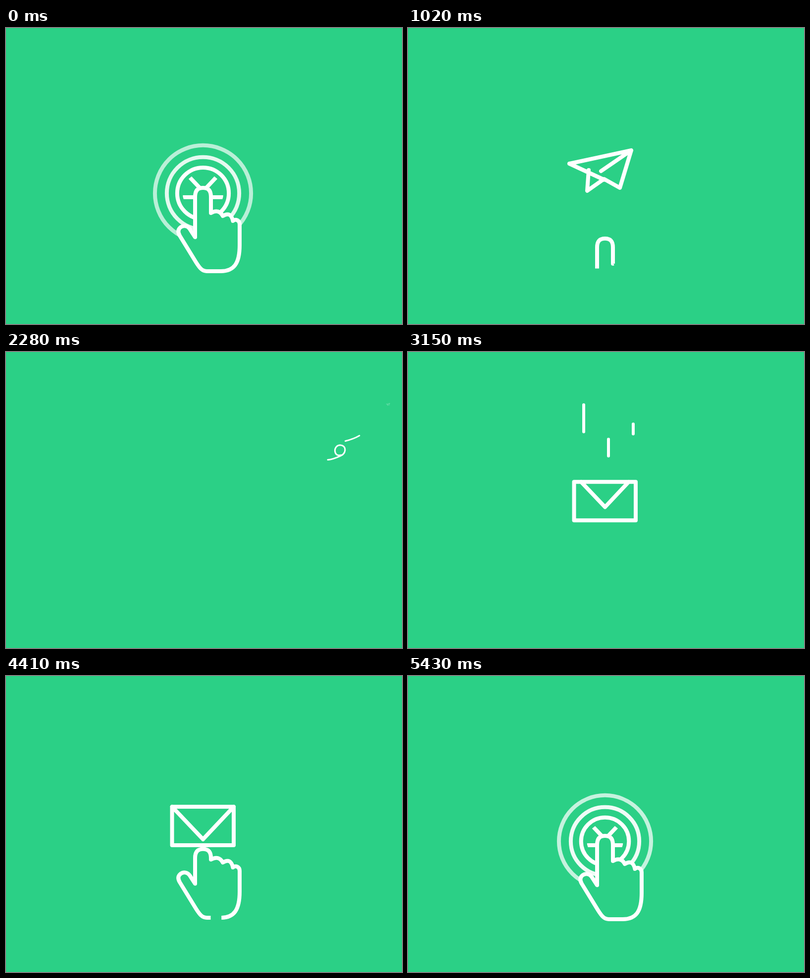
Write an HTML page that moves like this. It is 800 by 600 pixels and loops after 5460 ms.

```html
<!DOCTYPE html>
<html lang="en">
<head>
<meta charset="utf-8">
<title>Send mail</title>
<style>
  html, body { margin: 0; width: 100%; height: 100%; overflow: hidden; background: #2bd086; }
  svg { display: block; width: 100%; height: 100%; }
</style>
</head>
<body>
<svg viewBox="0 0 800 600" fill="none" stroke="#fff" stroke-width="8" stroke-linejoin="round">
  <clipPath id="reveal"><circle id="hole" cx="398" cy="335"/></clipPath>
  <g id="rings"></g>
  <g id="speed" stroke-width="6" stroke-linecap="round"></g>
  <g id="trail" stroke-width="3" stroke-linecap="round">
    <path id="loop" pathLength="1" d="M650 218.500C660 218 670 213 677 210C684 206.500 686 200 684.500 195C682 188 672 187 667.500 192C663 197 664 205 668 208C671 210 675 209.500 677 209"/>
    <path id="dash" pathLength="1" d="M685.500 180.500Q702 176.500 714 169.500"/>
  </g>
  <g id="mailClip"><path id="mail" stroke-linecap="round"/></g>
  <g id="hand">
    <path id="palm" fill="#2bd086" stroke="none"/>
    <path id="left" pathLength="1"/>
    <path id="right" pathLength="1"/>
  </g>
</svg>
<script>
const LOOP = 5460, STEP = 30;
const $ = id => document.getElementById(id);
const set = (el, attrs) => { for (const k in attrs) el.setAttribute(k, attrs[k]); };
const show = (el, on) => { el.style.display = on ? '' : 'none'; };
const clamp = x => Math.min(1, Math.max(0, x));
const span = (t, a, b) => clamp((t - a) / (b - a));
const mix = (a, b, u) => a + (b - a) * u;
const easeIO = u => u < .5 ? 2 * u * u : 1 - 2 * (1 - u) ** 2;
const easeOut = u => 1 - (1 - u) ** 2;

function add(parent, tag) {
  return parent.appendChild(document.createElementNS('http://www.w3.org/2000/svg', tag));
}

// radius at the loop point, speed, deceleration, step at which the ring has faded
const rings = [[97, 3.945, .055, 12.8], [73, 3.94, .061, 16.6], [52, 3.75, .07, 20.4]]
  .map(spec => ({ spec, el: add($('rings'), 'circle') }));
// x, top, length
const lines = [[355, 38, 176], [405, 134, 109], [455, 121, 64]]
  .map(spec => ({ spec, el: add($('speed'), 'path') }));

const plane = [[326, 275], [451, 248], [428, 324], [396, 306], [362, 330], [365, 288], [396, 307.5], [390, 290]];

function envelope(flap) {
  const inset = flap * .95, tip = [398, 331 - flap];
  return {
    corners: [[335.5, 265], [460, 265], [460, 343], [398, 343], [335.5, 343], [335.5, 265], tip, tip],
    hinge: [[335.5 + inset, 265], [460 - inset, 265]]
  };
}

function drawMail(t) {
  const visible = t < 2420 || t >= 2910;
  show($('mail'), visible);
  if (!visible) return;
  const u = t < 2500 ? easeIO(span(t, 600, 900)) : 0;
  const flap = t > 2500 ? 15 * (1 - easeIO(span(t, 3130, 3480))) : 0;
  const env = envelope(flap);
  const blend = (p, q) => [mix(p[0], q[0], u), mix(p[1], q[1], u)];
  const p = env.corners.map((c, i) => blend(c, plane[i]));
  const [a, b] = env.hinge.map((c, i) => blend(c, plane[i]));
  let place = '', opacity = 1;
  if (t > 2500) {
    place = `translate(0 ${dropY(t)})`;
    opacity = span(t, 2880, 2970);
  } else if (t >= 1110) {
    const back = easeIO(span(t, 1110, 1680));
    const fly = easeIO(span(t, 1680, 2400)), rest = 1 - fly;
    const curve = (from, bend, to) => rest * rest * from + 2 * rest * fly * bend + fly * fly * to;
    const x = t < 1680 ? 388 - 48 * back : curve(340, 705, 781);
    const y = t < 1680 ? 290 + 24 * back : curve(314, 215, 93);
    place = `translate(${x} ${y}) scale(${rest}) translate(-388 -290)`;
    opacity = 1 - .55 * span(fly, .8, .95);
  }
  set($('mail'), {
    d: `M${p.slice(0, 6).join('L')}M${a}L${p[6]}M${b}L${p[7]}`,
    transform: place, opacity
  });
}

function dropY(t) {
  if (t < 3150) return mix(-226, -2, span(t, 2910, 3150));
  if (t < 3210) return mix(-2, 6, easeOut(span(t, 3150, 3210)));
  return 6 * (1 - easeIO(span(t, 3210, 3540)));
}

function drawReveal(t, n) {
  let r = 200;
  if (t >= 4700) r = 105 * (1 - easeIO(span(t, 4700, 4980)));
  if (n >= -9 && n < 16) r = 41 + 4.5 * n;
  set($('hole'), { r: Math.max(0, r) });
  if (r < 110) $('mailClip').setAttribute('clip-path', 'url(#reveal)');
  else $('mailClip').removeAttribute('clip-path');
}

function drawRings(n) {
  for (const { spec: [base, speed, slow, end], el } of rings) {
    const r = base + speed * n - slow * n * n;
    show(el, r > 0 && n < end);
    if (r > 0) set(el, { cx: 398, cy: 335, r, opacity: clamp((end - n) / 19) });
  }
}

function drawSpeed(t) {
  const ceiling = 265 + dropY(t) - 14;
  for (const { spec: [x, top, length], el } of lines) {
    const head = Math.min(ceiling, top + length * span(t, 2940, 3240));
    const tail = top + length * span(t, 3010, 3370);
    show(el, t >= 2940 && t < 3370 && head > tail);
    set(el, { d: `M${x} ${tail}V${head}` });
  }
}

function trim(el, from, to) {
  show(el, to - from > .002);
  set(el, { 'stroke-dasharray': `${to - from} 3`, 'stroke-dashoffset': -from });
}

function drawTrail(t) {
  trim($('loop'), easeIO(span(t, 2295, 2500)), easeIO(span(t, 2050, 2240)));
  trim($('dash'), easeIO(span(t, 2360, 2560)), easeIO(span(t, 2170, 2275)));
}

function drawHand(t) {
  const leaving = t < 1140, visible = leaving || t >= 3570;
  show($('hand'), visible);
  if (!visible) return;
  let y, short = 0, p, q;
  if (leaving) {
    y = 106 * easeIO(span(t, 400, 1110));
    p = q = clamp((1160 - t) / 575);
  } else {
    const press = easeOut(span(t, 4410, 4680));
    y = mix(100, -3, easeIO(span(t, 3960, 4410))) + 3 * press;
    short = 30 * (1 - press);
    p = span(t, 3570, 4483);
    q = Math.min(1, p * 1.08);
  }
  const top = 324 + short, side = top + 18;
  const left = `M398 ${top}C388 ${top} 382 ${top + 5} 382 ${side}V424L371 407C366 400 358 400 352.500 404C347.500 408 347 414 351 421L384 475C391 486 396 493 406 493H434`;
  const right = `M398 ${top}C408 ${top} 414 ${top + 5} 414 ${side}V375Q430 366 438 381Q454 371 458.500 391C464 386 472 390 472 398V440C472 478 460 493 434 493`;
  set($('hand'), { transform: `translate(0 ${y})` });
  set($('left'), { d: left });
  set($('right'), { d: right });
  set($('palm'), { d: left + right });
  trim($('left'), 0, p);
  trim($('right'), 0, q);
}

function draw(time) {
  const t = time % LOOP;
  const n = (t < 2000 ? t : t - LOOP) / STEP;
  drawRings(n);
  drawSpeed(t);
  drawTrail(t);
  drawReveal(t, n);
  drawMail(t);
  drawHand(t);
}

const start = performance.now();
function tick() {
  draw(performance.now() - start);
  requestAnimationFrame(tick);
}
tick();
</script>
</body>
</html>
```
